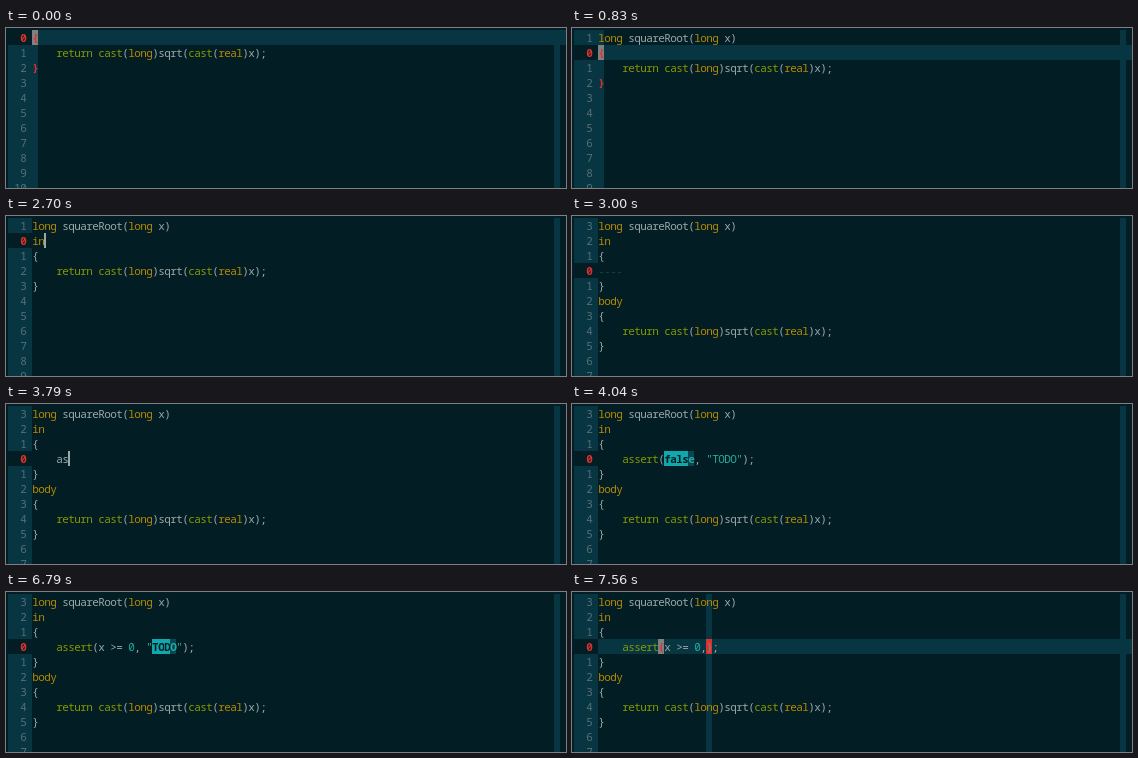
Write an HTML page with a canvas that moves like this. It is 560 px wide and 160 px high and loops after 8000 ms.

```html
<!DOCTYPE html>
<html lang="en">
<head>
<meta charset="utf-8">
<title>Editor session</title>
<style>
  html, body { margin: 0; width: 560px; height: 160px; overflow: hidden; background: #031d24; }
  canvas { display: block; }
</style>
</head>
<body>
<canvas id="stage" width="560" height="160"></canvas>
<script>
const ctx = document.getElementById('stage').getContext('2d');
const LOOP = 8000, CELL = 6, ROW = 15, LEFT = 26, TOP = 2, ROWS = 11;
const FONT = '11px "Noto Sans Mono", "DejaVu Sans Mono", monospace';
const C = {
  bg: '#031d24', panel: '#073642', number: '#586e75', red: '#dc322f',
  text: '#9aa8a8', type: '#b58900', word: '#859900', value: '#22ac9e',
  match: '#808080', dash: '#17424c', select: '#10a8ac', selectEnd: '#0a4654'
};

const head = 'long squareRoot(long x)';
const body = ['{', '    return cast(long)sqrt(cast(real)x);', '}'];
const withTop = line => [head, line, ...body];
const contract = line => [head, 'in', '{', line, '}', 'body', ...body];
const check = args => contract(`    assert(${args});`);

// Each step changes part of the editor state; "on" shows the cursor.
const steps = [];
let last = { sel: null, match: null };
const step = (t, change) => steps.push(last = { ...last, ...change, t });
// A key press redraws the text first and the cursor 40 ms later.
const key = (t, change, delay = 40) => {
  step(t, { ...change, on: false });
  step(t + delay, { on: true });
};

key(0, { lines: body, row: 0, col: 0, mode: 'normal', match: [2, 0] });
key(190, { lines: [head, ...body], row: 1, match: [3, 0] });
key(830, {});
step(1100, { lines: withTop(''), row: 2, match: [4, 0], on: false });
step(1370, { on: true });
key(1510, {});
key(1700, { row: 1, mode: 'insert', match: null });
key(1980, {});
key(2370, { lines: withTop('i'), col: 1 });
key(2620, { lines: withTop('in'), col: 2 });
key(3000, { lines: contract('    '), row: 3, col: 4 }, 80);
key(3530, { lines: contract('    a'), col: 5 });
key(3710, { lines: contract('    as'), col: 6 });
step(3960, { lines: check('false, "TODO"'), col: 15, on: false });
step(4000, { mode: 'normal' });
step(4040, { mode: 'select', sel: [11, 15] });
key(4450, { lines: check('x, "TODO"'), col: 12, mode: 'insert', sel: null }, 80);
key(4700, { lines: check('x , "TODO"'), col: 13 });
key(4930, { lines: check('x >, "TODO"'), col: 14 });
key(5200, { lines: check('x >=, "TODO"'), col: 15 });
key(5410, { lines: check('x >= , "TODO"'), col: 16 });
key(6400, { lines: check('x >= 0, "TODO"'), col: 17 });
key(6790, { col: 23, mode: 'select', sel: [20, 23] });
key(7240, { mode: 'normal', sel: null });
key(7520, { lines: check('x >= 0,'), col: 18, match: [3, 10] });

const cellX = col => LEFT + col * CELL;
const rowY = row => TOP + row * ROW;

function rect(x, y, w, h, color) {
  ctx.fillStyle = color;
  ctx.fillRect(x, y, w, h);
}

function glyph(ch, x, y, color, bold) {
  ctx.font = (bold ? 'bold ' : '') + FONT;
  ctx.fillStyle = color;
  ctx.fillText(ch, x + CELL / 2 + 0.5, y + 12);
}

function block(row, col, ch, back, front, bold) {
  rect(cellX(col), rowY(row), CELL, ROW, back);
  glyph(ch, cellX(col), rowY(row), front, bold);
}

function tokenColor(token) {
  if (/^(long|real|in|body)$/.test(token)) return C.type;
  if (/^(return|cast|assert)$/.test(token)) return C.word;
  if (/^(false|\d+|".*")$/.test(token)) return C.value;
  return C.text;
}

function drawLine(line, row) {
  const blank = line && !line.trim();
  if (blank) {
    [...line].forEach((_, i) => glyph('-', cellX(i), rowY(row), C.dash));
    return;
  }
  for (const m of line.matchAll(/"[^"]*"|\w+|[^\w\s]/g)) {
    const color = tokenColor(m[0]);
    [...m[0]].forEach((ch, i) => glyph(ch, cellX(m.index + i), rowY(row), color));
  }
}

function drawPanels(s) {
  rect(0, 0, 560, 160, C.bg);
  rect(2, TOP, 24, 158, C.panel);
  rect(548, TOP, 6, 158, C.panel);
  rect(2, rowY(s.row), 24, ROW, C.bg);
  if (s.mode === 'normal') {
    rect(LEFT, rowY(s.row), 560 - LEFT, ROW, C.panel);
    rect(cellX(s.col), TOP, CELL, 158, C.panel);
  }
}

function drawNumbers(s) {
  for (let row = 0; row < ROWS; row++) {
    const n = String(Math.abs(row - s.row)), current = row === s.row;
    [...n].forEach((ch, i) =>
      glyph(ch, 20 - (n.length - i) * CELL, rowY(row), current ? C.red : C.number, current));
  }
}

function drawMatch(s) {
  const [row, col] = s.match, ch = s.lines[row][col];
  block(row, col, ch, ch === '(' ? C.match : C.panel, C.red, true);
}

function drawCursor(s) {
  const ch = s.lines[s.row][s.col] || ' ';
  if (s.mode === 'select') {
    const [from, to] = s.sel;
    for (let col = from; col < to; col++) {
      block(s.row, col, s.lines[s.row][col], C.select, C.bg, true);
    }
    block(s.row, to, ch, C.selectEnd, C.value, true);
  } else if (s.mode === 'insert') {
    if (s.on) rect(cellX(s.col), rowY(s.row), 2, ROW, C.text);
  } else if (s.match) {
    const [back, front] = s.on ? [C.red, C.match] : [C.match, C.red];
    block(s.row, s.col, ch, back, front, true);
  } else if (s.on) {
    block(s.row, s.col, ch, C.value, C.panel);
  }
}

function draw(t) {
  const s = steps.findLast(item => item.t <= t);
  ctx.textAlign = 'center';
  drawPanels(s);
  drawNumbers(s);
  s.lines.forEach(drawLine);
  if (s.match) drawMatch(s);
  drawCursor(s);
}

const start = performance.now();
function tick() {
  draw((performance.now() - start) % LOOP);
  requestAnimationFrame(tick);
}
tick();
</script>
</body>
</html>
```
